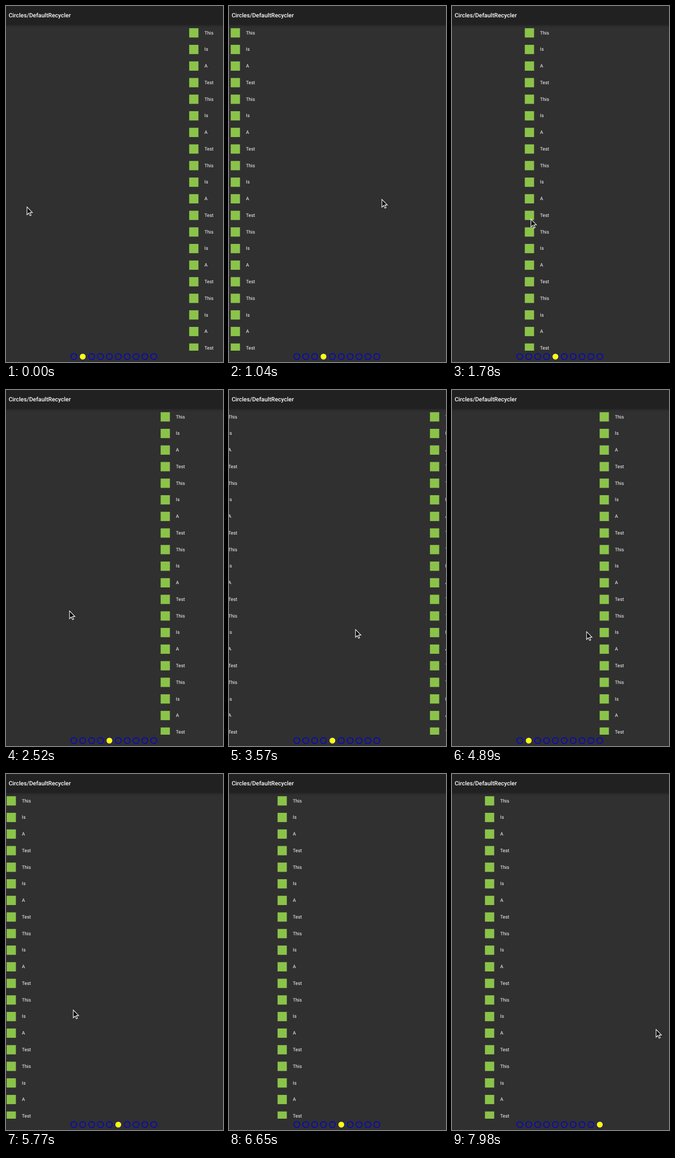
Recreate the animation shown at these times as an HTML page with a canvas. Size 403 by 660 pixels, loop 8 s.

```html
<!DOCTYPE html>
<html lang="en">
<head>
<meta charset="utf-8">
<title>Circles/DefaultRecycler</title>
<style>
html, body { margin: 0; width: 100%; height: 100%; overflow: hidden; background: #303030; }
canvas { display: block; width: 403px; height: 660px; }
</style>
</head>
<body>
<canvas id="stage"></canvas>
<script>
const W = 403, H = 660, LOOP = 8000, TICK = 148;
const canvas = document.getElementById('stage');
const ctx = canvas.getContext('2d');
const dpr = window.devicePixelRatio || 1;
canvas.width = W * dpr;
canvas.height = H * dpr;
ctx.scale(dpr, dpr);
ctx.textRendering = 'geometricPrecision';

const WORDS = ['This', 'Is', 'A', 'Test'];
const ROWS = 20, PITCH = 30.76;
const DOTS = 10;

// Swipes and rests: [tick, pages scrolled]
const SCROLL = [
  [0, 1.163], [7, 3], [9, 3], [16, 4], [17, 4.295], [21, 6], [23, 6], [28, 0.675],
  [31, 0], [32, 0], [39, 5.005], [45, 4.784], [48, 9], [52, 9], [54, 8.856]
];

// Pointer tip at the turns of its path: [tick, x, y]
const POINTER = [
  [0, 39, 372.5], [7, 284, 358.5], [11, 60, 392], [14, 320, 402], [17, 118, 409.5], [21, 70, 432],
  [25, 290, 448], [28, 120, 456.5], [33, 250, 448], [39, 125, 437.5], [44, -20, 448],
  [45, 420, 470], [54, 379, 473.5]
];

const linear = u => u;
const easeOut = u => u * (2 - u);

// Value in column col of the keys at tick t
function track(keys, t, ease, col = 1) {
  const i = keys.findIndex(key => key[0] > t);
  if (i < 0) return keys[keys.length - 1][col];
  const a = keys[i - 1], b = keys[i];
  return a[col] + (b[col] - a[col]) * ease((t - a[0]) / (b[0] - a[0]));
}

function drawList(x) {
  ctx.font = '8.8px Roboto, sans-serif';
  for (let i = 0; i < ROWS; i++) {
    const y = i * PITCH;
    ctx.fillStyle = '#8bc34a';
    ctx.fillRect(x + 3.2, y + 41.2, 17.2, 17.2);
    ctx.fillStyle = '#fff';
    ctx.fillText(WORDS[i % WORDS.length], x + 31.5, y + 52.6);
  }
}

function drawPages(scroll) {
  ctx.save();
  ctx.beginPath();
  ctx.rect(0, 35, W, 604);
  ctx.clip();
  const first = Math.floor(scroll);
  for (let page = first; page <= first + 1; page++) {
    const x = Math.round((page - scroll) * W);
    if (x < W && page < DOTS) drawList(x);
  }
  ctx.restore();
}

function drawHeader() {
  ctx.fillStyle = '#212121';
  ctx.fillRect(0, 0, W, 35);
  const shade = ctx.createLinearGradient(0, 35, 0, 40);
  shade.addColorStop(0, 'rgba(0,0,0,0.2)');
  shade.addColorStop(1, 'rgba(0,0,0,0)');
  ctx.fillStyle = shade;
  ctx.fillRect(0, 35, W, 5);
  ctx.fillStyle = '#fff';
  ctx.font = '500 10.95px Roboto, sans-serif';
  ctx.fillText('Circles/DefaultRecycler', 4.9, 20.6);
}

function drawDots(active) {
  ctx.lineWidth = 1.4;
  ctx.strokeStyle = '#0000d8';
  ctx.fillStyle = '#ff0';
  for (let i = 0; i < DOTS; i++) {
    ctx.beginPath();
    ctx.arc(126 + i * 16.5, 650, 5.5, 0, Math.PI * 2);
    ctx.stroke();
    if (i === active) ctx.fill();
  }
}

const ARROW = new Path2D('M0 0V14.4L3.3 11.3L5.6 16.4L7.7 15.5L5.5 10.4H10Z');

function drawPointer(x, y) {
  ctx.save();
  ctx.translate(x, y);
  ctx.fillStyle = '#000';
  ctx.strokeStyle = '#fff';
  ctx.lineWidth = 1.1;
  ctx.fill(ARROW);
  ctx.stroke(ARROW);
  ctx.restore();
}

function draw(ms) {
  // The screen refreshes once per tick
  const tick = Math.floor(ms / TICK + 0.1);
  const scroll = track(SCROLL, tick, easeOut);
  ctx.fillStyle = '#303030';
  ctx.fillRect(0, 0, W, H);
  drawPages(scroll);
  drawHeader();
  drawDots(Math.round(scroll));
  drawPointer(track(POINTER, tick, linear, 1), track(POINTER, tick, linear, 2));
}

const start = performance.now();
function loop() {
  draw((performance.now() - start) % LOOP);
  requestAnimationFrame(loop);
}
draw(0);
requestAnimationFrame(loop);
</script>
</body>
</html>
```
